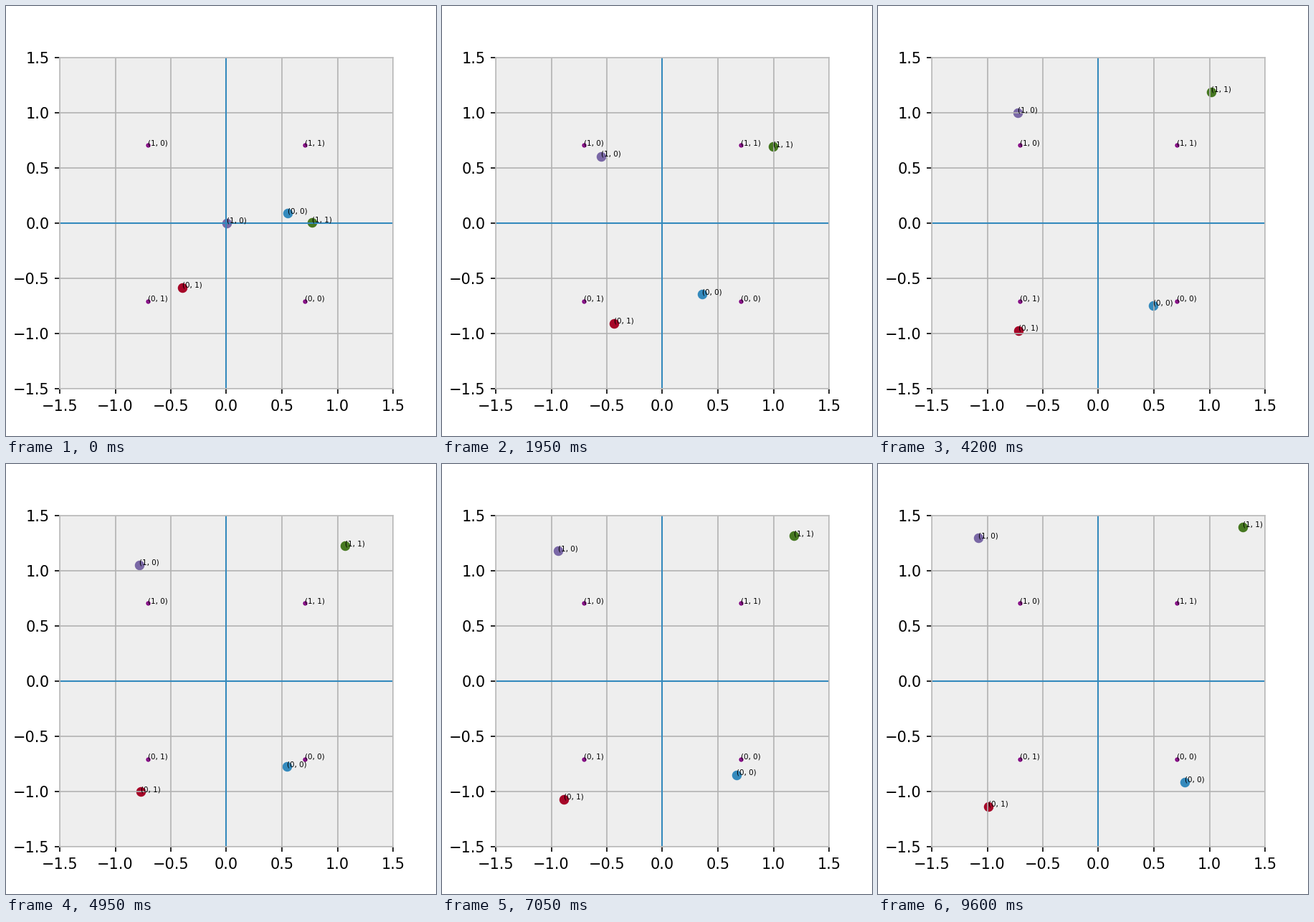
Recreate the animation shown at these times as a matplotlib script. Size 600 px wide and 600 px high, loop 9.75 s.

```python
import numpy as np
import matplotlib.pyplot as plt
from matplotlib.animation import FuncAnimation

FRAMES = 65
INTERVAL = 150
BLUE, RED, PURPLE, GREEN = "#348ABD", "#A60628", "#7A68A6", "#467821"
ZERO = -1e-10  # keeps the centre line on the left of its half pixel

plt.rcParams.update({
    "font.family": "DejaVu Sans",
    "font.size": 10,
    "axes.facecolor": "#eeeeee",
    "axes.edgecolor": "#bcbcbc",
    "axes.grid": True,
    "axes.axisbelow": "line",
    "grid.color": "#b2b2b2",
})

# Each symbol leaves its start, spreads out, settles and then drifts outwards
STAGES = (0, 13, 22, 64)
SYMBOLS = {
    "(0, 0)": (BLUE, (.55 + .09j, .36 - .643j, .428 - .705j, .78 - .915j)),
    "(0, 1)": (RED, (-.396 - .583j, -.435 - .909j, -.661 - .937j, -.989 - 1.134j)),
    "(1, 0)": (PURPLE, (.004 + .003j, -.55 + .606j, -.641 + .934j, -1.083 + 1.298j)),
    "(1, 1)": (GREEN, (.772 + .009j, .995 + .694j, .953 + 1.142j, 1.297 + 1.399j)),
}


def position(points, frame):
    """Point on the path at a frame, with a mild ease-out in every stage."""
    i = min(np.searchsorted(STAGES, frame, side="right"), len(STAGES) - 1)
    s = (frame - STAGES[i - 1]) / (STAGES[i] - STAGES[i - 1])
    s += 0.35 * s * (1 - s)
    p = points[i - 1] + s * (points[i] - points[i - 1])
    return p.real, p.imag


def add_point(x, y, label, color, size):
    dot = ax.scatter([x], [y], s=size, color=color, linewidths=2)
    text = ax.text(x, y, label, fontsize=5, color="black")
    return dot, text


fig, ax = plt.subplots(figsize=(4, 4), dpi=150, facecolor="white")
fig.subplots_adjust(left=0.125, right=0.9, bottom=0.11, top=0.88)
ticks = [-1.5, -1, -0.5, ZERO, 0.5, 1, 1.5]
ax.set(xlim=(-1.5, 1.5), ylim=(-1.5, 1.5), xticks=ticks, yticks=ticks)
ax.axhline(ZERO, color=BLUE, linewidth=1)
ax.axvline(ZERO, color=BLUE, linewidth=1)

movers = []
for k, (label, (color, points)) in enumerate(SYMBOLS.items()):
    # Ideal place of the symbol on the unit circle, one per quadrant
    angle = -np.pi / 4 - k * np.pi / 2
    add_point(np.cos(angle), np.sin(angle), label, "purple", 1)
    movers.append((points, *add_point(*position(points, 0), label, color, 20)))


def update(frame):
    artists = []
    for points, dot, text in movers:
        place = position(points, frame)
        dot.set_offsets([place])
        text.set_position(place)
        artists += [dot, text]
    return artists


anim = FuncAnimation(fig, update, frames=FRAMES, interval=INTERVAL,
                     repeat=True, repeat_delay=0, blit=False)
plt.show()
```
